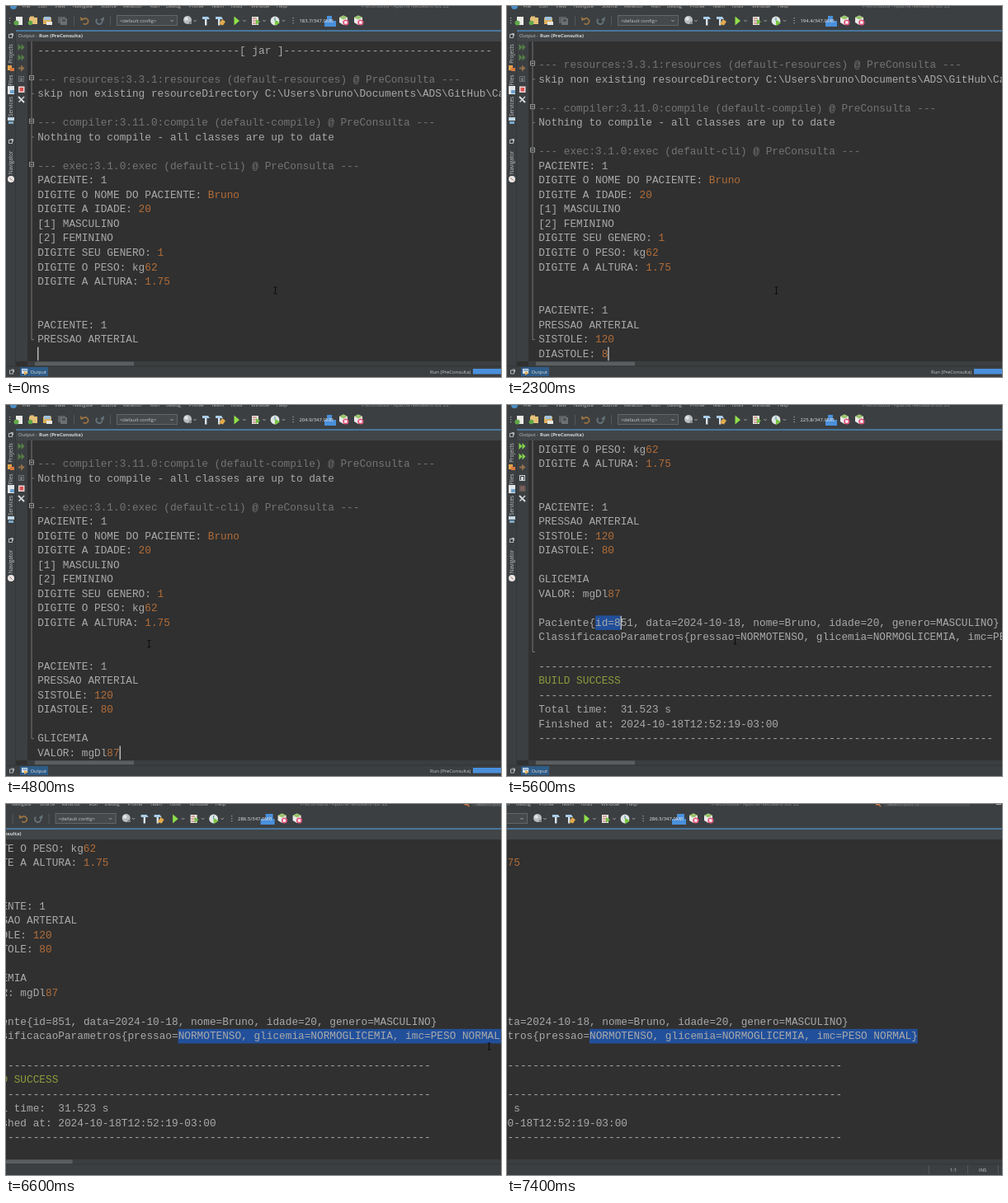
Animation of 600 by 450 pixels, one loop 7.5 s. Source, as an HTML page with a canvas:

```html
<!DOCTYPE html>
<html lang="pt">
<head>
<meta charset="utf-8">
<title>PreConsulta</title>
<style>
html, body { margin: 0; width: 100%; height: 100%; overflow: hidden; background: #303030; }
canvas { display: block; width: 600px; height: 450px; }
</style>
</head>
<body>
<canvas id="stage" width="600" height="450"></canvas>
<script>
const g = document.getElementById('stage').getContext('2d');
const LOOP = 7500, CW = 7.65, LH = 17.53, LEFT = 38.2;
const MONO = '12.75px "Liberation Mono", "Courier New", monospace';
const UI = '"Open Sans", "Noto Sans", sans-serif';
const TEXT = '#a9a9a9', DIM = '#747474', INPUT = '#b36d38', OK = '#8f9b3c';
const PANEL = '#3c3f41', BACK = '#303030', EDGE = '#343739', SELECT = '#214f9a', BLUE = '#4a90dc';
const DONE = 5000;
const rule = '-'.repeat(72);

// [start time, text, colour, typed text, key times]
const lines = [
  [0, '-'.repeat(32) + '[ jar ]' + '-'.repeat(33)],
  [0, ''],
  [0, '--- resources:3.3.1:resources (default-resources) @ PreConsulta ---', DIM],
  [0, 'skip non existing resourceDirectory C:\\Users\\bruno\\Documents\\ADS\\GitHub\\Ca'],
  [0, ''],
  [0, '--- compiler:3.11.0:compile (default-compile) @ PreConsulta ---', DIM],
  [0, 'Nothing to compile - all classes are up to date'],
  [0, ''],
  [0, '--- exec:3.1.0:exec (default-cli) @ PreConsulta ---', DIM],
  [0, 'PACIENTE: 1'],
  [0, 'DIGITE O NOME DO PACIENTE: ', TEXT, 'Bruno'],
  [0, 'DIGITE A IDADE: ', TEXT, '20'],
  [0, '[1] MASCULINO'],
  [0, '[2] FEMININO'],
  [0, 'DIGITE SEU GENERO: ', TEXT, '1'],
  [0, 'DIGITE O PESO: kg', TEXT, '62'],
  [0, 'DIGITE A ALTURA: ', TEXT, '1.75'],
  [0, ''],
  [0, ''],
  [0, 'PACIENTE: 1'],
  [0, 'PRESSAO ARTERIAL'],
  [150, 'SISTOLE: ', TEXT, '120', [650, 900, 1150]],
  [1700, 'DIASTOLE: ', TEXT, '80', [2200, 2450]],
  [2850, ''],
  [2850, 'GLICEMIA'],
  [2850, 'VALOR: mgDl', TEXT, '87', [4100, 4400]],
  [4900, ''],
  [4900, 'Paciente{id=851, data=2024-10-18, nome=Bruno, idade=20, genero=MASCULINO}'],
  [4900, 'ClassificacaoParametros{pressao=NORMOTENSO, glicemia=NORMOGLICEMIA, imc=PESO NORMAL}'],
  [DONE, ''],
  [DONE, rule],
  [DONE, 'BUILD SUCCESS', OK],
  [DONE, rule],
  [DONE, 'Total time:  31.523 s'],
  [DONE, 'Finished at: 2024-10-18T12:52:19-03:00'],
  [DONE, rule]
];
const memory = [[0, 183.7], [700, 187.1], [1400, 190], [2200, 194.4], [3000, 197.4],
  [4200, 204.9], [5000, 225.8], [5800, 259.3], [6300, 286.5]];
const pointer = [[0, 326, 345], [4450, 326, 345], [4950, 108, 266], [5100, 108, 266],
  [5400, 138, 266], [5600, 276, 286], [5800, 283, 283], [6600, 659, 294], [7000, 840, 300]];
const menu = [['File', 20], ['Edit', 39], ['View', 59], ['Navigate', 81], ['Source', 115],
  ['Refactor', 142], ['Run', 175], ['Debug', 194], ['Profile', 222], ['Team', 249],
  ['Tools', 272], ['Window', 297], ['Help', 328]];

function box(x, y, w, h, c) { g.fillStyle = c; g.fillRect(x, y, w, h); }
function frame(x, y, w, h, c) { g.strokeStyle = c; g.lineWidth = 1; g.strokeRect(x, y, w, h); }
function dot(x, y, r, c) { g.fillStyle = c; g.beginPath(); g.arc(x, y, r, 0, 7); g.fill(); }
function path(c, w, ...p) {
  g.strokeStyle = c; g.lineWidth = w; g.beginPath();
  for (let i = 0; i < p.length; i += 2) g.lineTo(p[i], p[i + 1]);
  g.stroke();
}
function poly(c, ...p) {
  g.fillStyle = c; g.beginPath();
  for (let i = 0; i < p.length; i += 2) g.lineTo(p[i], p[i + 1]);
  g.fill();
}
function label(s, x, y, c = '#c4c4c4', size = 5.9, weight = '') {
  g.font = `${weight} ${size}px ${UI}`; g.fillStyle = c; g.fillText(s, x, y);
}
function chevron(x, y = 18) { path('#aaa', .9, x - 1.7, y - 1, x, y + .8, x + 1.7, y - 1); }
function grip(x) { for (const y of [14, 17, 20]) box(x, y, 1.2, 1.2, '#a4a4a4'); }
function at(keys, t) {
  let i = 0;
  while (i < keys.length - 2 && t >= keys[i + 1][0]) i++;
  const a = keys[i], b = keys[i + 1];
  const u = Math.max(0, Math.min(1, (t - a[0]) / (b[0] - a[0])));
  return [a[1] + (b[1] - a[1]) * u, a[2] + (b[2] - a[2]) * u];
}
function pan(t) {
  const u = Math.max(0, Math.min(1, (t - 5980) / 1420));
  return 183 * u * u * (3 - 2 * u);
}

function hammer(x) {
  poly('#a9cdea', x - 4, 13, x + 3, 13, x + 5, 16, x - 4, 16);
  box(x - 1, 16, 2.4, 7.5, '#d8e4ee');
}
function sheet(x, y, c) { box(x - 4, y - 5, 8, 10, c); }
function curl(x, dir, c) {
  g.strokeStyle = c; g.lineWidth = 1.8; g.beginPath();
  g.arc(x, 18.5, 3.6, dir > 0 ? -2.6 : -.5, dir > 0 ? 2.3 : 4, false); g.stroke();
  poly(c, x - dir * 6, 13, x - dir * 5.5, 18, x - dir, 16.5);
}
function stopMark(x) {
  poly('#ececec', x, 11.5, x + 5, 14, x + 5, 20, x, 23, x - 5, 20, x - 5, 14);
  poly('#9ac46b', x, 11.5, x + 5, 14, x, 16.5, x - 5, 14);
  dot(x + 2.8, 20, 3.6, '#e0577c');
  box(x + 1.2, 18.4, 3.2, 3.2, '#fff');
}

function topBar(t) {
  box(0, 0, 800, 30, PANEL);
  dot(9, 0, 4, '#4c8fc8');
  for (const [s, x] of menu) label(s, x, 2, '#bdbdbd');
  label('PreConsulta - Apache NetBeans IDE 22', 431, 2, '#8e9092');
  dot(632, -1, 2.5, '#d9824a');
  path('#d9824a', 1.3, 633, 0, 636, 3);
  box(640, -6, 104, 9, '#484b4d');
  label('Search (Ctrl+I)', 644, 2, '#8c8e90');
  box(776, 0, 6, 1, '#aaa');

  grip(4);
  sheet(16, 18, '#ecece8'); dot(12.5, 20.5, 3, '#62a84a');
  box(28, 14, 10, 8, '#e4c078'); box(29, 12.5, 5, 2, '#e4c078'); dot(29.5, 20.5, 2.8, '#62a84a');
  box(45, 14, 10, 8, '#dcb160'); box(46, 13, 8, 4, '#9fc1dc'); box(49, 19, 7, 4, '#e5e5e2');
  box(63, 13, 9, 8, '#5d6164'); box(66, 15, 8, 8, '#6c7073'); box(68, 16, 4, 3, '#4c5053');
  path('#55585a', 1, 82.5, 12, 82.5, 24);
  curl(96, 1, '#9a7444');
  curl(113, -1, '#64727a');
  path('#55585a', 1, 126.5, 12, 126.5, 24);
  box(134, 11.5, 74, 12.5, '#46494b'); frame(134.5, 11.5, 73, 12, '#636669');
  label('<default config>', 138, 20); chevron(201);
  dot(220, 17, 5, '#b9bcc0'); dot(218.5, 15.5, 2.3, '#e4e4e4'); box(222, 19, 3, 3, '#858a8d'); chevron(229);
  hammer(242);
  hammer(258); poly('#e0a94d', 262, 16, 266, 19, 263, 23.5, 258, 22);
  poly('#8fe04a', 276.5, 12.5, 283, 18, 276.5, 23.5); chevron(289);
  sheet(302, 18, '#e4e4e0');
  for (let i = 0; i < 3; i++) box(299, 14.5 + i * 3, 4.5, 1, '#c06552');
  poly('#74c043', 303, 16, 308, 19, 303, 23); chevron(313);
  dot(326, 18, 5.4, '#dfe5e3'); path('#458aaa', 1, 326, 14, 326, 18, 329, 19);
  poly('#78c53d', 326, 17, 332, 20.5, 326, 24); chevron(336.5);
  grip(347.5);

  let used = 0;
  for (const [start, v] of memory) if (t >= start) used = v;
  const high = used > 280 ? 3 : 0;
  box(386 - high, 18, 14 + high, 7, BLUE);
  box(389, 12, 6 + high, 8, BLUE);
  label(used.toFixed(1) + '/347.0MB', 355.5, 20, '#e6e6e6');
  stopMark(409); stopMark(427);

  box(12, 30, 788, 13, '#414547');
  box(12, 29.2, 788, 1.7, '#4a7fab');
  label('Output - ', 15, 38.3, '#c2c2c2');
  label('Run (PreConsulta)', 40, 38.3, '#dadada', 5.9, 'bold');
}

function upright(s, y) {
  g.save(); g.translate(8.3, y); g.rotate(-Math.PI / 2);
  g.textAlign = 'center'; label(s, 0, 0, '#c4c4c4', 6.3); g.restore();
}
function restore(x, y) {
  frame(x - 2.5, y - 1.5, 4, 4, '#b0b0b0');
  path('#b0b0b0', 1, x - .5, y - 2.5, x + 2.5, y - 2.5, x + 2.5, y + .5);
}
function sideBar(running) {
  box(0, 30, 12, 407, PANEL);
  box(11, 30, 1, 407, EDGE);
  box(12, 43, 14, 388, PANEL);
  restore(6, 36); restore(6, 164);
  upright('Projects', 58); upright('Files', 90); upright('Services', 122); upright('Navigator', 190);
  box(2, 72, 5, 6, '#e1a34c'); box(5, 75, 5, 4, '#d8783d');
  sheet(6, 102, '#e2e5e7'); box(5, 102, 5, 4, '#6ea3cf');
  box(2, 135, 8, 4, '#c3d8e6'); box(3, 140, 6, 3, '#7ba6c6');
  dot(6, 210, 4, '#e9e7e5'); path('#b26a62', 1, 4.5, 208.5, 7.5, 211.5);

  for (const y of [50, 62.5]) {
    const c = running ? '#557f47' : '#82d44d';
    for (const x of [14.5, 18.5]) poly(c, x, y - 4, x + 4, y, x, y + 4);
  }
  path('#927049', 2, 15, 75.5, 19, 75.5);
  poly('#927049', 18, 71.5, 22.5, 75.5, 18, 79.5);
  frame(15.5, 85.5, 6, 6, running ? '#6c7072' : '#cfd3d5');
  box(17, 87, 3, 4, running ? '#6c7072' : '#cfd3d5');
  box(15, 97.5, 7.5, 7.5, running ? '#ecd6d6' : '#6b5651');
  box(16.5, 99, 4.5, 4.5, running ? '#dd5151' : '#79635e');
  path('#e2e2e2', 1.8, 15, 110, 22, 117);
  path('#c6ced2', 1.6, 22, 110, 15.5, 116.5);
}

function selection(row, from, to, top) {
  box(LEFT + from * CW, top + row * LH, (to - from) * CW, LH, SELECT);
}
function output(t, mouse) {
  const shown = lines.filter(l => t >= l[0]);
  const last = shown[shown.length - 1];
  const open = last[3] && last[4];
  let row = shown.length - (open ? 1 : 0), key = last[0], col = 0;
  const scroll = row - 21, top = 45 - scroll * LH;

  g.save();
  g.beginPath(); g.rect(26, 43, 800, 388); g.clip();
  box(26, 43, 800, 388, BACK);
  const foldEnd = t < DONE ? row - 1 : 29;
  const mid = i => top + (i + .5) * LH;
  path('#747678', 1, 31, 43, 31, mid(foldEnd) + .3, 34, mid(foldEnd) + .3);
  for (const i of [3, 6]) path('#747678', 1, 31, mid(i), 34, mid(i));
  for (const i of [2, 5, 8]) {
    const y = mid(i) - 1.8;
    box(28, y - 3, 6, 6, BACK); frame(28.5, y - 2.5, 5, 5, '#929496');
    path('#b0b0b0', 1, 29.5, y, 32.5, y);
  }

  const picking = t >= 5100 && t < 5750, dragging = t >= 5800;
  if (picking) {
    col = t < 5400 ? Math.round((mouse[0] - LEFT) / CW) : 13;
    col = Math.max(9, Math.min(13, col));
    selection(27, 9, col, top);
  }
  if (dragging) {
    const end = mouse[1] > 290 ? 84 : Math.round((mouse[0] - LEFT) / CW);
    selection(28, 32, Math.max(32, Math.min(84, end)), top);
  }

  g.font = MONO;
  shown.forEach(([, s, c = TEXT, typed = '', keys], i) => {
    const y = top + 12.6 + i * LH;
    if (y < 40 || y > 445) return;
    g.fillStyle = c; g.fillText(s, LEFT, y);
    const n = keys ? keys.filter(k => t >= k).length : typed.length;
    g.fillStyle = INPUT; g.fillText(typed.slice(0, n), LEFT + s.length * CW, y);
    if (open && i === row) {
      col = s.length + n;
      if (n) key = keys[n - 1];
    }
  });
  if (picking) { row = 27; key = t; }
  if (t < 5750 && (t - key) % 1000 < 500)
    box(LEFT + col * CW, top + row * LH + .5, 1.2, 16.5, '#d8d8d8');
  g.restore();
}

function bottomBar(running) {
  box(26, 431, 800, 6, '#3b3e40');
  box(35, 431.5, 120, 5, '#5b5e60');
  box(0, 437, 800, 13, PANEL);
  box(0, 436.5, 800, 1, '#323537');
  restore(7, 443.5);
  box(17, 438, 34, 11, '#2f5c88');
  box(19, 440, 7, 6, '#d9dee2'); box(20, 441, 7, 1.5, '#6ea4d4'); poly('#e4b05a', 22, 443, 27, 445, 22, 448);
  label('Output', 29.5, 446, '#dadada');
  if (running) {
    label('Run (PreConsulta)', 514, 446, '#c8c8c8');
    box(566, 440, 60, 6.5, BLUE);
  }
  for (const x of [694, 741, 778]) path('#55585a', 1, x + .5, 438, x + .5, 449);
  label('1:1', 720, 446, '#d0d0d0'); label('INS', 755, 446, '#d0d0d0');
}

function ibeam([x, y]) {
  const c = '#0c0c0c';
  path(c, 1, x + .5, y - 4, x + .5, y + 4);
  for (const d of [-4, 4]) path(c, 1, x - 1.5, y + d, x + 2.5, y + d);
}

function draw(t) {
  const mouse = at(pointer, t), running = t < DONE;
  g.setTransform(1, 0, 0, 1, 0, 0);
  box(0, 0, 600, 450, BACK);
  g.translate(-pan(t), 0);
  topBar(t);
  output(t, mouse);
  sideBar(running);
  bottomBar(running);
  ibeam(mouse);
}

const begin = performance.now();
function tick() {
  draw((performance.now() - begin) % LOOP);
  requestAnimationFrame(tick);
}
tick();
</script>
</body>
</html>
```
